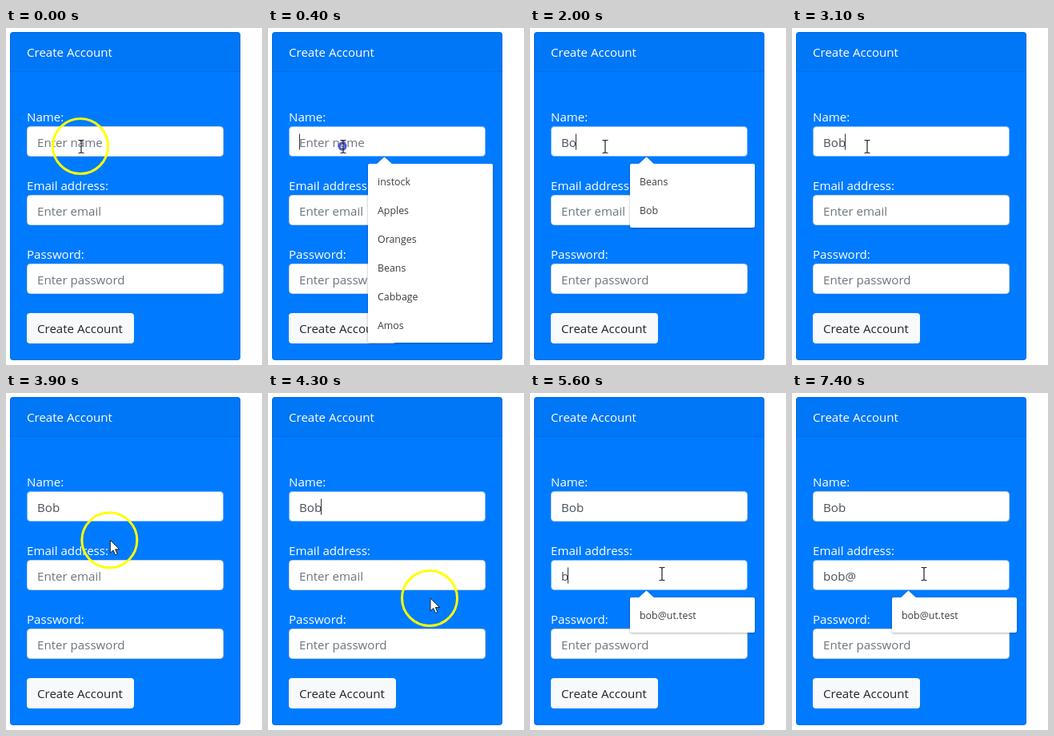
Animation, 320 px wide and 422 px high, one loop 8 s. Source, as an HTML page:

```html
<!DOCTYPE html>
<html lang="en">
<head>
<meta charset="utf-8">
<title>Create Account</title>
<style>
  html, body { margin: 0; width: 100%; height: 100%; overflow: hidden; background: #fff; }
  svg { display: block; width: 320px; height: 422px; }
  text { font: 15.1px "Open Sans", "Noto Sans", sans-serif; fill: #fff; white-space: pre; }
  .field { fill: #fff; stroke: #ced4da; }
  .field.focus { stroke: #80bdff; }
  .value { fill: #495057; }
  .value.empty { fill: #6c757d; }
  .popup { filter: drop-shadow(0 1px 1.5px rgba(0, 0, 0, .3)); }
  .popup rect, .popup path { fill: #fff; }
  .popup text { font-size: 12.4px; fill: #3a3d40; }
  .caret { fill: #333; }
</style>
</head>
<body>
<svg viewBox="0 0 320 422">
  <rect x="5" y="5" width="288" height="411" rx="4" fill="#007bff"/>
  <path d="M5 54V9a4 4 0 0 1 4-4h280a4 4 0 0 1 4 4v45z" fill="#000" fill-opacity=".035"/>
  <path d="M5 54.5h288" stroke="#000" stroke-opacity=".1"/>
  <rect x="5.5" y="5.5" width="287" height="410" rx="3.5" fill="none" stroke="#000" stroke-opacity=".1"/>
  <text x="26" y="36">Create Account</text>
  <g id="form"></g>
  <rect x="26" y="357" width="134" height="38" rx="4" fill="#f8f9fa"/>
  <text x="39" y="382" style="fill:#212529">Create Account</text>
  <rect id="caret" class="caret" width="1" height="20"/>
  <g id="popup" class="popup"></g>
  <circle id="ring" fill="none" stroke-width="3"/>
  <g id="pointer">
    <path id="beam" fill="none" stroke="#222" stroke-width="1.2"
      d="M-3.5 -7.5h2.5l1 1l1 -1h2.5M0 -6.5v14M-3.5 8.5h2.5l1 -1l1 1h2.5"/>
    <path id="arrow" fill="#fff" stroke="#222" stroke-linejoin="round"
      d="M0 0v16l3.7 -3.5l2.6 6l2.6 -1.1l-2.6 -5.9h5.2z"/>
  </g>
</svg>
<script>
const LOOP = 8000, STEP = 100;
const $ = id => document.getElementById(id);

const fields = [
  { label: "Name:", hint: "Enter name", y: 123 },
  { label: "Email address:", hint: "Enter email", y: 209 },
  { label: "Password:", hint: "Enter password", y: 295 }
];
$("form").innerHTML = fields.map(f => `
  <text x="26" y="${f.y - 6}">${f.label}</text>
  <rect class="field" x="26.5" y="${f.y + .5}" width="245" height="37" rx="4"/>
  <text class="value" x="39" y="${f.y + 26}"></text>`).join("");
const boxes = document.querySelectorAll(".field");
const values = document.querySelectorAll(".value");

const allNames = ["instock", "Apples", "Oranges", "Beans", "Cabbage", "Amos"];
const allMails = ["lor4ntiks.squad@post.test", "sssss", "camilla.torretti@post.te",
  "elias@ut.test", "rosa@post.test", "ivy@ut.test"];

// Each list holds [start time, value] pairs; the latest one applies.
const names = [[0, ""], [1600, "B"], [2000, "Bo"], [2100, "Bob"]];
const mails = [[0, ""], [5600, "b"], [5700, "bo"], [5900, "bob"], [7000, "bob@"]];
const focus = [[0, -1], [200, 0], [4700, 1]];
const caretOn = [[0, 0], [200, 1], [700, 0], [1200, 1], [2600, 0], [3100, 1], [3600, 0],
  [4100, 1], [5200, 0], [5600, 1], [6500, 0], [7000, 1], [7400, 0]];
const popups = [[0, null], [300, [0, 156, allNames]], [1600, [0, 156, ["Beans", "Bob"]]],
  [2200, null], [4800, [1, 193, allMails]], [5600, [1, 156, ["bob@ut.test"]]]];
const path = [[0, 94, 148], [3700, 94, 148], [4300, 203, 257], [4400, 161, 227],
  [4800, 162, 227], [4900, 165, 226], [LOOP, 165, 226]];
const clicks = [200, 4700];

const at = (list, t) => list.findLast(([start]) => start <= t)[1];

function pointerAt(t) {
  const i = path.findIndex(p => p[0] > t);
  const [a, b] = [path[i - 1], path[i]];
  const k = (t - a[0]) / (b[0] - a[0]);
  return [a[1] + (b[1] - a[1]) * k, a[2] + (b[2] - a[2]) * k];
}

function attrs(el, map) {
  for (const key in map) el.setAttribute(key, map[key]);
}

let shown;
function drawPopup(state) {
  if (state === shown) return;
  shown = state;
  if (!state) { $("popup").innerHTML = ""; return; }
  const [index, width, items] = state, top = fields[index].y + 47;
  $("popup").innerHTML = `
    <path d="M135 ${top + 1}l10.5 -9.5l10.5 9.5z"/>
    <rect x="125" y="${top}" width="${width}" height="${items.length * 36 + 8}" rx="2"/>` +
    items.map((s, i) => `<text x="137" y="${top + 27 + i * 36}">${s}</text>`).join("");
}

function drawPointer(t) {
  const [x, y] = pointerAt(t);
  const onField = x > 26 && x < 272 && fields.some(f => y > f.y && y < f.y + 38);
  attrs($("pointer"), { transform: `translate(${x} ${y})` });
  attrs($("beam"), { opacity: onField ? 1 : 0 });
  attrs($("arrow"), { opacity: onField ? 0 : 1 });

  const age = t - (clicks.findLast(c => c <= t) ?? Infinity);
  const clicking = age >= 0 && age < 300;
  const hovering = t < clicks[0] || (t >= 3800 && t < clicks[1]);
  attrs($("ring"), {
    cx: x - 1, cy: y,
    r: clicking ? 16 - age * .06 : 34.5,
    stroke: clicking ? "#4a55dc" : "#ffff00",
    opacity: clicking || hovering ? 1 : 0
  });
}

function draw(t) {
  const typed = [at(names, t), at(mails, t), ""];
  const active = at(focus, t);
  fields.forEach((f, i) => {
    values[i].textContent = typed[i] || f.hint;
    values[i].classList.toggle("empty", !typed[i]);
    boxes[i].classList.toggle("focus", i === active);
  });
  const on = active >= 0 && at(caretOn, t);
  attrs($("caret"), { opacity: on ? 1 : 0 });
  if (on) {
    const width = typed[active] ? values[active].getComputedTextLength() : 0;
    attrs($("caret"), { x: Math.floor(39 + width - .5), y: fields[active].y + 9.5 });
    if (!typed[active]) attrs($("caret"), { x: 39 });
  }
  drawPopup(at(popups, t));
  drawPointer(t);
}

const origin = performance.now();
function tick() {
  const t = (performance.now() - origin) % LOOP;
  draw(Math.floor(t / STEP) * STEP);
  requestAnimationFrame(tick);
}
tick();
</script>
</body>
</html>
```
